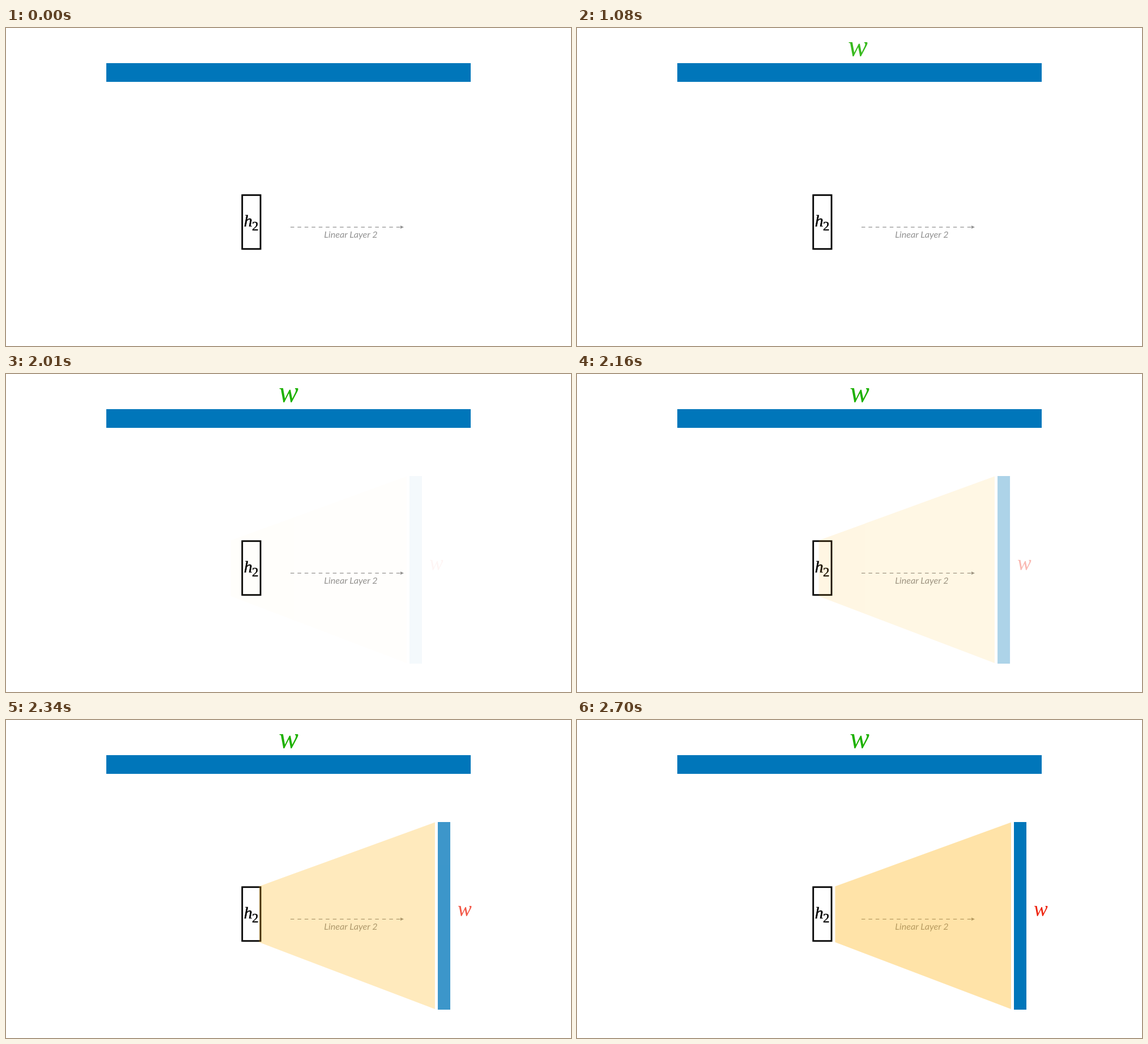
These frames come from a looping animation (997x561 px, 3180 ms). An HTML page:

```html
<!DOCTYPE html>
<html lang="en">
<head>
<meta charset="utf-8">
<style>
  html, body { margin: 0; width: 100%; height: 100%; overflow: hidden; background: #fff; }
  svg { display: block; width: 100%; height: 100%; }
  text { text-anchor: middle; }
  .math { font-family: "Liberation Serif", "Times New Roman", serif; }
  .italic { font-style: italic; }
  .blue { fill: #0076ba; }
</style>
</head>
<body>
<svg viewBox="0 0 997 561">
  <rect class="blue" x="177" y="62" width="643" height="33"/>

  <rect x="416.8" y="294.8" width="32.3" height="95" fill="none" stroke="#000" stroke-width="2.8"/>
  <g class="math" stroke="#000" stroke-width=".5">
    <text class="italic" x="427.3" y="349.5" font-size="30">h</text>
    <text x="439.8" y="356.5" font-size="23">2</text>
  </g>

  <g fill="#929292">
    <path d="M502 351.3H697" stroke="#929292" stroke-width="1.2" stroke-dasharray="6.5 5.95"/>
    <path d="M696 348.5L702 351.3L696 354.1Z"/>
    <text class="italic" x="608.5" y="370.3" font-size="16.2" font-family="Lato, sans-serif">Linear Layer 2</text>
  </g>

  <g id="weight">
    <text class="math italic" x="498.5" y="48.5" font-size="52" fill="#1db100">w</text>
  </g>

  <g id="layer">
    <path d="M455.5 293.5L766 180.5V510L455.5 392Z" fill="#feae00" fill-opacity=".34"/>
    <rect class="blue" x="771" y="180" width="22" height="331"/>
    <text class="math italic" x="818.4" y="345.8" font-size="37" fill="#ee220c">w</text>
  </g>
</svg>
<script>
  const LOOP = 3180, STEP = 30, SLIDE = 740;
  const entrances = [
    { node: document.getElementById("weight"), start: 660, distance: 37.4 },
    { node: document.getElementById("layer"), start: 1980, distance: 66.8 }
  ];
  const smooth = x => x * x * (3 - 2 * x);

  function render() {
    const time = Math.floor(performance.now() % LOOP / STEP) * STEP;
    for (const { node, start, distance } of entrances) {
      const t = time - start;
      const left = Math.min(1, Math.max(0, 1 - t / SLIDE));
      node.setAttribute("transform", `translate(${-distance * left ** 3} 0)`);
      node.setAttribute("opacity", t > 0 ? smooth(Math.min(1, 0.07 + 0.0017 * t)) : 0);
    }
    requestAnimationFrame(render);
  }
  render();
</script>
</body>
</html>
```
